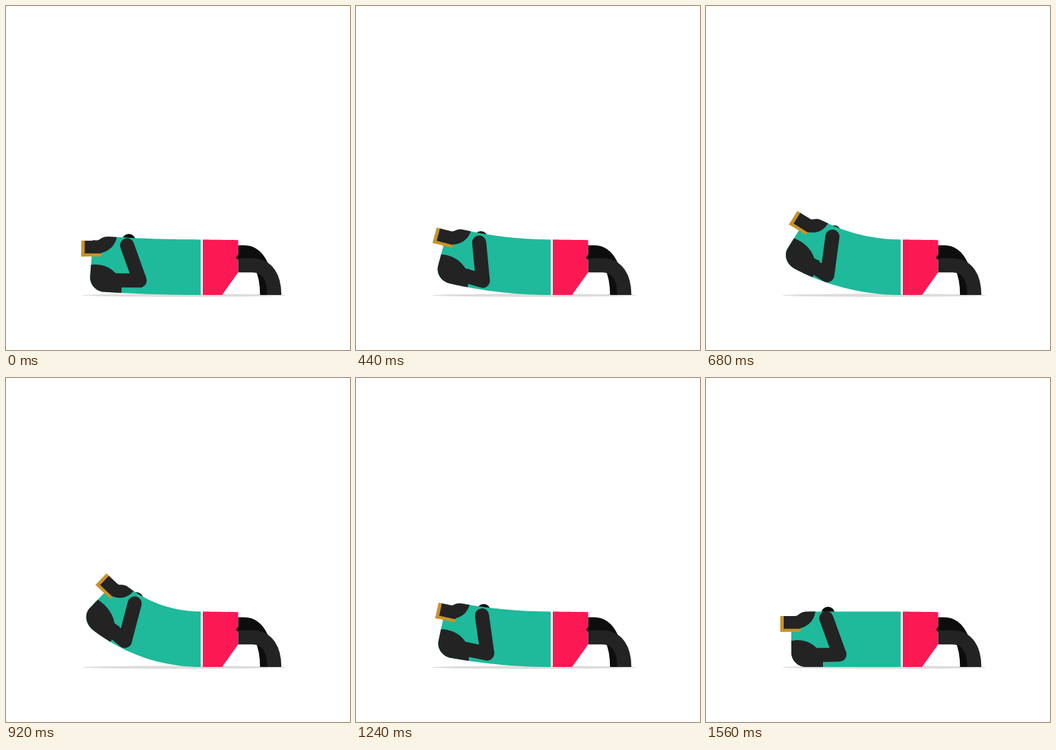
An HTML page with a canvas for the animation above (1720 ms loop, 500 px wide and 500 px high).

```html
<!DOCTYPE html>
<html lang="en">
<head>
<meta charset="utf-8">
<title>Crunch</title>
<style>
html, body { margin: 0; width: 100%; height: 100%; overflow: hidden; background: #fff; }
canvas { display: block; width: 500px; height: 500px; }
</style>
</head>
<body>
<canvas id="stage"></canvas>
<script>
const LOOP = 1720, STEP = 40, FALL = 1120, REST = 1560;
const HIP = 283, AXIS = 374, LENGTH = 159;
const TEAL = '#1fb99b', PINK = '#fc1853', SKIN = '#232323', FAR = '#0d0d0d', GOLD = '#c99329';

// Time and torso bend in degrees: three lifts, then a quick fall.
const BEND = [[0, 4.2], [440, 15], [560, 32], [800, 32], [FALL, 51], [1240, 12], [REST, 0]];

// Each shape starts at a point; pairs are lines, sextuples are cubic curves.
const CORNER = [[145, 420], [133.5, 420, 124, 410.5, 124, 399]];
const TORSO = [[124, 362], [132, 360], [142, 344], [150, 339.4], [HIP, 339.4], [HIP, 420], ...CORNER];
const CHEST = [[124, 346], [129, 346], [135, 346, 136, 339.4, 147, 339.4], [159, 339.4],
  [157, 352, 149, 362, 132, 365], [124, 364]];
const SHOULDER = [[124, 382], [138, 379, 153, 383, 162, 394], [170, 394], [170, 420], ...CORNER];
const SHORTS = [[286, 339.5], [337.5, 340.2], [337.5, 387], [314, 420], [286, 420]];
const NOTCH = [[338, 361], [334, 366], [338, 369]];
const FAR_LEG = new Path2D('M337.5 358 H346 C369 358 379.5 390 379.5 420');
const NEAR_LEG = new Path2D('M337.5 377 H358 C380 377 390 395 390 420');

const canvas = document.getElementById('stage');
const ctx = canvas.getContext('2d');
const dpr = window.devicePixelRatio || 1;
canvas.width = canvas.height = 500 * dpr;

const rad = deg => deg * Math.PI / 180;
const flat = (x, y) => [x, y];

function bendAt(t) {
  const i = Math.max(1, BEND.findIndex(([time]) => t <= time));
  const [t0, a] = BEND[i - 1], [t1, b] = BEND[i];
  const u = (t - t0) / (t1 - t0);
  return a + (b - a) * u * (2 - u);
}

// Rolls the torso around a centre above the hip, keeping its axis length.
function bender(deg) {
  if (deg < 0.01) return flat;
  const r = LENGTH / rad(deg);
  return (x, y) => {
    const a = (HIP - x) / r, d = r + y - AXIS;
    return [HIP - d * Math.sin(a), AXIS - r + d * Math.cos(a)];
  };
}

function fill(shape, color, map = flat) {
  let [x, y] = shape[0];
  ctx.beginPath();
  ctx.moveTo(...map(x, y));
  for (const s of [...shape.slice(1), shape[0]]) {
    const [ex, ey] = s.slice(-2);
    for (let i = 1; i <= 24; i++) {
      const u = i / 24, v = 1 - u;
      const at = (a, b, c, d) => s.length === 6
        ? v * v * v * a + 3 * v * v * u * b + 3 * v * u * u * c + u * u * u * d
        : v * a + u * d;
      ctx.lineTo(...map(at(x, s[0], s[2], ex), at(y, s[1], s[3], ey)));
    }
    [x, y] = [ex, ey];
  }
  ctx.fillStyle = color;
  ctx.fill();
}

function oval(x, y, rx, ry, color) {
  ctx.beginPath();
  ctx.ellipse(x, y, rx, ry, 0, 0, 2 * Math.PI);
  ctx.fillStyle = color;
  ctx.fill();
}

function box(x, y, w, h, color) {
  ctx.fillStyle = color;
  ctx.fillRect(x, y, w, h);
}

function limb(path, color, cap) {
  ctx.lineWidth = 20.5;
  ctx.lineCap = cap;
  ctx.lineJoin = 'round';
  ctx.strokeStyle = color;
  ctx.stroke(path);
}

// The origin is the nape, where the head hinges.
function drawHead([x, y], tilt) {
  ctx.save();
  ctx.translate(x, y);
  ctx.rotate(rad(tilt));
  box(-25, -9, 25, 19, SKIN);
  box(-29, -9, 5, 23, GOLD);
  box(-29, 9.5, 29.5, 4.5, GOLD);
  ctx.restore();
}

function draw(t) {
  const bend = bendAt(t), map = bender(bend);
  const droop = 4.2 * Math.exp(-t / 180);
  const pull = t > FALL ? 6.5 * Math.sin(Math.PI * (t - FALL) / (REST - FALL)) : 0;

  const [napeX, napeY] = map(137, 355);
  const handX = 174.8 + 0.28 * bend + pull;
  const handY = 349 - 0.27 * bend - 0.005 * bend ** 2;
  const elbowX = 194 - 0.75 * bend + 0.006 * bend ** 2 + 0.8 * droop + pull;
  const elbowY = 402 - 0.0104 * bend ** 2 - 0.7 * droop;

  ctx.setTransform(dpr, 0, 0, dpr, 0, 0);
  box(0, 0, 500, 500, '#fff');
  oval(259, 420.5, 148, 2.2, '#dcdcdc');
  fill(SHORTS, PINK);
  limb(FAR_LEG, FAR, 'butt');
  fill(NOTCH, FAR);
  limb(NEAR_LEG, SKIN, 'butt');
  oval(handX + 2.5, handY - 6.5, 10, 10, FAR);
  fill(TORSO, TEAL, map);
  fill(CHEST, SKIN, map);
  fill(SHOULDER, SKIN, map);
  drawHead([napeX + pull, napeY], bend - droop);

  const arm = new Path2D();
  for (const p of [map(150, 403), [elbowX, elbowY], [handX, handY]]) arm.lineTo(...p);
  limb(arm, SKIN, 'round');
}

function tick() {
  const t = performance.now() % LOOP;
  draw(Math.min(Math.floor(t / STEP) * STEP, REST));
  requestAnimationFrame(tick);
}
tick();
</script>
</body>
</html>
```
